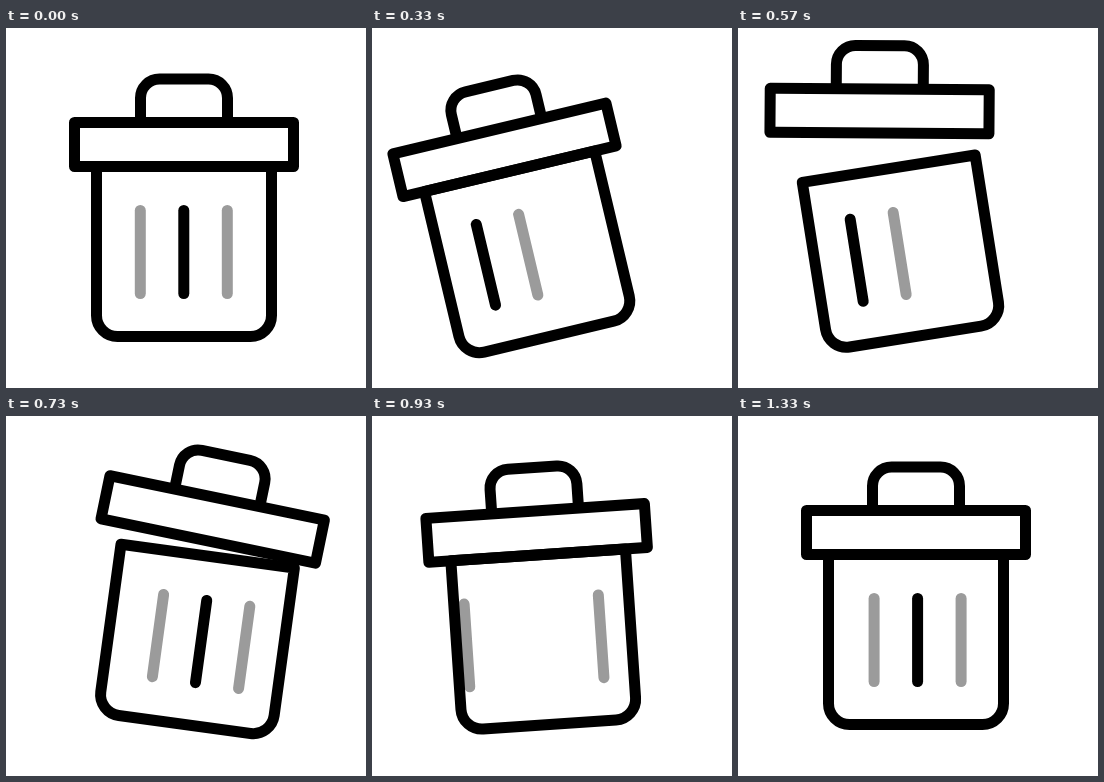
Animation, 360 px wide and 360 px high, one loop 2 s. Source, as an HTML page:

```html
<!DOCTYPE html>
<html lang="en">
<head>
<meta charset="utf-8">
<title>Trash can</title>
<style>
  html, body { margin: 0; width: 100%; height: 100%; overflow: hidden; background: #fff; }
  svg { display: block; width: 100vw; height: 100vh; }
  .ink { fill: none; stroke: #000; stroke-width: 11; stroke-linejoin: round; }
  .bar { stroke-width: 11; stroke-linecap: round; }
</style>
</head>
<body>
<svg viewBox="0 0 360 360">
  <defs>
    <path id="shell" d="M90.5 138.5H265.5V287.5A21 21 0 0 1 244.5 308.5H111.5A21 21 0 0 1 90.5 287.5Z"/>
    <clipPath id="inside"><use href="#shell"/></clipPath>
    <g id="bars" class="bar">
      <path d="M134.3 182.5V265.5" stroke="#9b9b9b"/>
      <path d="M177.8 182.5V265.5" stroke="#000"/>
      <path d="M221.3 182.5V265.5" stroke="#9b9b9b"/>
    </g>
  </defs>
  <g id="can">
    <g clip-path="url(#inside)">
      <g id="belt">
        <use href="#bars"/>
        <use href="#bars" x="-221.5"/>
      </g>
    </g>
    <use href="#shell" class="ink"/>
    <g id="lid" class="ink">
      <path d="M134.5 94.5V70A19 19 0 0 1 153.5 51H202.5A19 19 0 0 1 221.5 70V94.5"/>
      <path d="M68.5 94.5H287.5V138.5H68.5Z"/>
    </g>
  </g>
</svg>
<script>
  const FPS = 30, LOOP = 60;

  // Each track: [frame, value], eased between neighbours.
  const tilt = [[0, 0], [14, -16.5], [22, 7.8], [28, -3.9], [34, 2], [40, 0]];
  const slide = [[0, 0], [14, -54.8], [40, 223.3]];
  const open = [[10, 0], [17, 1], [26, 0]];

  const ease = u => (1 - Math.cos(Math.PI * u)) / 2;

  function valueAt(track, f) {
    if (f <= track[0][0]) return track[0][1];
    for (let i = 1; i < track.length; i++) {
      const [f0, v0] = track[i - 1], [f1, v1] = track[i];
      if (f <= f1) return v0 + (v1 - v0) * ease((f - f0) / (f1 - f0));
    }
    return track[track.length - 1][1];
  }

  const move = (id, value) => document.getElementById(id).setAttribute("transform", value);

  function draw(ms) {
    // Stepped at 30 fps, with step times rounded to 10 ms.
    const f = Math.floor((ms + 3.5) * FPS / 1000) % LOOP;
    const lift = valueAt(open, f);
    move("can", `rotate(${valueAt(tilt, f)} 178 313)`);
    move("belt", `translate(${valueAt(slide, f)} 0)`);
    move("lid", `translate(0 ${-36.3 * lift}) rotate(${9.4 * lift} 178 116.5)`);
  }

  const start = performance.now();
  function tick(now) {
    draw(Math.max(0, now - start));
    requestAnimationFrame(tick);
  }
  draw(0);
  requestAnimationFrame(tick);
</script>
</body>
</html>
```
